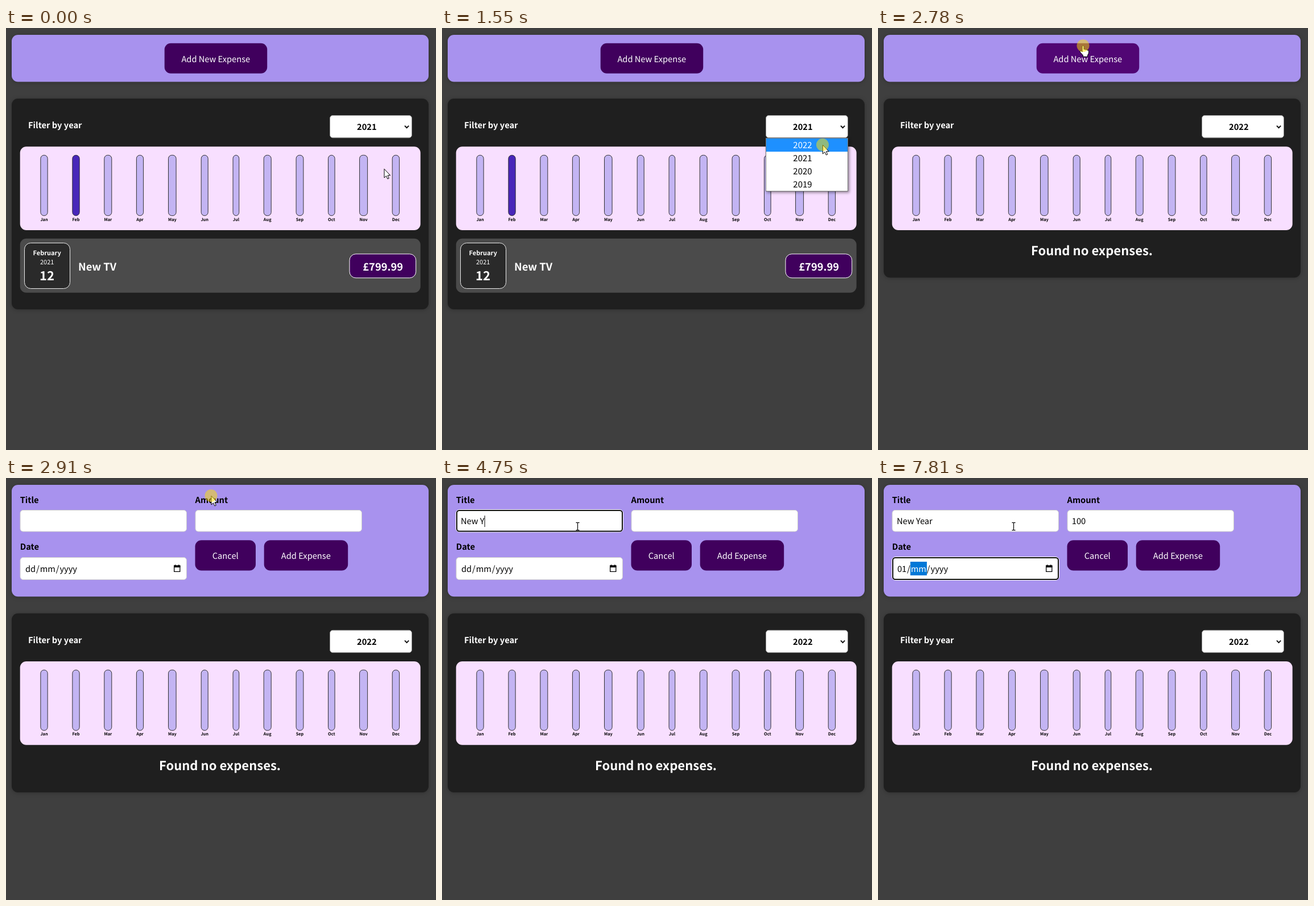
An HTML page for the animation above (8 s loop, 756 by 741 pixels).

```html
<!DOCTYPE html>
<html lang="en">
<head>
<meta charset="utf-8">
<title>Expense tracker</title>
<style>
  html, body { margin: 0; width: 100%; height: 100%; overflow: hidden; background: #3f3f3f; }
  svg { display: block; width: 756px; height: 741px; }
  text {
    font: 14.67px "Noto Sans CJK JP", "Noto Sans CJK SC", "Noto Sans CJK", sans-serif;
    white-space: pre; text-rendering: geometricPrecision;
  }
  .b { font-weight: 700; }
  .w { fill: #fff; }
  .m { text-anchor: middle; }
  .card { filter: drop-shadow(0 1px 3.7px rgba(0,0,0,.25)); }
  .btn { fill: #40005d; }
  .field { fill: #fff; stroke: #ccc; }
  .popup { filter: drop-shadow(2px 2px 2.5px rgba(0,0,0,.45)); }
</style>
</head>
<body>
<svg viewBox="0 0 756 741">
  <rect width="756" height="741" fill="#3f3f3f"/>
  <rect id="top" class="card" x="10" y="12" width="733" height="82.5" rx="11" fill="#a892ee"/>

  <g id="closed">
    <rect id="addNew" x="278.7" y="26.7" width="180.5" height="53" rx="11"/>
    <text class="w m" x="368.8" y="59.6">Add New Expense</text>
  </g>

  <g id="form">
    <text class="b" x="24.7" y="43.6">Title</text>
    <text class="b" x="332.5" y="43.6">Amount</text>
    <text class="b" x="24.7" y="126.3">Date</text>
    <rect class="field" x="25" y="56.5" width="292.5" height="37.5" rx="5"/>
    <rect class="field" x="333" y="56.5" width="292.5" height="37.5" rx="5"/>
    <rect class="field" x="25" y="139.5" width="292.5" height="39" rx="5"/>
    <g id="focus" fill="none">
      <rect id="ringOuter" stroke="#fff" rx="6.5"/>
      <rect id="ringInner" stroke="#101010" stroke-width="2" rx="4.5"/>
    </g>
    <text id="title" x="33" y="81.4"></text>
    <text id="amount" x="340.8" y="81.4"></text>
    <rect id="caret" y="66" width="1" height="20"/>
    <g id="spin">
      <rect x="603.5" y="66.5" width="14" height="18" fill="#efefef"/>
      <path d="M607 72.8L610.7 68.6L614.4 72.8ZM607 78.8H614.4L610.7 83Z" fill="#444"/>
    </g>
    <rect id="mark" y="147" height="24" fill="#0078d7"/>
    <g id="date"></g>
    <path d="M295.7 154.2H305.8V164.3H295.7Z" fill="none" stroke="#000" stroke-width="1.3"/>
    <path d="M295 153.5H306.4V157H295ZM296.8 152.3H298.4V154H296.8ZM303 152.3H304.6V154H303Z"/>
    <rect class="btn" x="332.5" y="109.2" width="106.5" height="53.2" rx="11"/>
    <rect class="btn" x="453.7" y="109.2" width="147.5" height="53.2" rx="11"/>
    <text class="w m" x="385.7" y="142.2">Cancel</text>
    <text class="w m" x="527.3" y="142.2">Add Expense</text>
  </g>

  <g id="panel">
    <rect id="body" class="card" x="10" y="124" width="733" rx="11" fill="#1f1f1f"/>
    <text class="b w" x="39" y="175.9">Filter by year</text>
    <rect x="569.5" y="153.5" width="144" height="39.3" rx="5" fill="#fff" stroke="#8a8a8a"/>
    <text id="year" class="b m" x="634.3" y="179.4"></text>
    <path d="M701 171.6L704.6 175.3L708.2 171.6" fill="none" stroke="#111" stroke-width="2"/>
    <rect x="24.7" y="208.2" width="704" height="146.7" rx="11" fill="#f8dfff"/>
    <g id="chart"></g>
    <g id="item">
      <rect x="24.7" y="369.7" width="704" height="95" rx="11" fill="#4b4b4b"/>
      <rect x="32.5" y="377.5" width="80" height="80" rx="11" fill="#2a2a2a" stroke="#ececec"/>
      <text class="b w m" x="72.2" y="399" style="font-size:11px">February</text>
      <text class="w m" x="72.2" y="414.6" style="font-size:11px">2021</text>
      <text class="b w m" x="72" y="443" style="font-size:22px">12</text>
      <text class="b w" x="127" y="425.7" style="font-size:18.33px">New TV</text>
      <rect class="btn" x="604" y="396.8" width="116.7" height="42" rx="11" stroke="#fff"/>
      <text class="b w m" x="662.7" y="425.7" style="font-size:18.33px">£799.99</text>
    </g>
    <text id="none" class="b w m" x="376" y="399" style="font-size:22px">Found no expenses.</text>
  </g>

  <g id="popup">
    <rect class="popup" x="569.5" y="193.5" width="144" height="93" fill="#fff" stroke="#767676"/>
    <rect id="hover" x="570" width="143" height="23.3" fill="#1e90ff"/>
    <g id="options"></g>
  </g>

  <g id="pointer">
    <path id="arrow" d="M.5 .5V16L4 12.7L6.4 18L8.8 17L6.5 11.8H11.2Z" fill="#fff" stroke="#000"/>
    <path id="hand" d="M-1.5 11V1Q0 -1 1.5 1V6.5Q3.5 5.5 4.5 7.2Q6.5 6.2 7.5 8Q9.5 7.5 10 9.5V13L8 17V19.5H0V17L-5.5 11Q-5.2 8.2 -3 9.2Z" fill="#fff" stroke="#000"/>
    <path id="beam" d="M-3 -6.7H-.8L0 -6L.8 -6.7H3M0 -6V6M-3 6.7H-.8L0 6L.8 6.7H3" fill="none" stroke="#000" stroke-width="1.2"/>
    <circle id="click" r="11" fill="#ffe100"/>
  </g>
</svg>
<script>
const LOOP = 8000;
const $ = id => document.getElementById(id);
const set = (el, attrs) => { for (const k in attrs) el.setAttribute(k, attrs[k]); return el; };
const show = (id, on) => { $(id).style.display = on ? "" : "none"; };
const add = (parent, tag, attrs, text = "") => {
  const el = set(document.createElementNS("http://www.w3.org/2000/svg", tag), attrs);
  el.textContent = text;
  return parent.appendChild(el);
};

// Month bars: [label, centre, width]
const months = [
  ["Jan", 67, 12.3], ["Feb", 123, 12.3], ["Mar", 179.3, 13], ["Apr", 235.5, 12.2],
  ["May", 292.3, 13.6], ["Jun", 349.2, 12], ["Jul", 404.4, 10.7], ["Aug", 459.7, 13],
  ["Sep", 516.5, 12.8], ["Oct", 572.3, 11.6], ["Nov", 628.6, 14], ["Dec", 685.4, 12.4]
];
const bar = (cx, w, attrs) =>
  add($("chart"), "rect", { x: cx - w / 2, y: 223.3, width: w, height: 106.2, rx: 6, ...attrs });
let fill;
for (const [label, cx, w] of months) {
  bar(cx, w, { fill: "#c3b4f3" });
  if (label === "Feb") fill = bar(cx, w, { fill: "#4826b9" });
  bar(cx, w, { fill: "none", stroke: "#313131" });
  add($("chart"), "text", { class: "b m", x: cx, y: 338.7, style: "font-size:7.33px" }, label);
}

const options = [2022, 2021, 2020, 2019].map((y, i) =>
  add($("options"), "text", { class: "m", x: 634, y: 211.4 + 23 * i, style: "font-size:15px" }, y));
const dateParts = [0, 1, 2, 3, 4].map(() => add($("date"), "text", { y: 165 }));

// Pointer hot spot: [time, x, y]
const path = [
  [40, 664.5, 247], [250, 669, 166], [830, 669, 166], [1150, 669, 199], [1250, 669, 199],
  [1350, 669, 205], [2190, 669, 205], [2640, 461, 90], [2740, 360.5, 31],
  [3130, 360.5, 31], [3580, 238.5, 85]
];
const clicks = [260, 1520, 2755, 3610];
const PICK = 1680, OPEN = 2910, FOCUS = 3620, TO_AMOUNT = 5680, TO_DATE = 7290;
const titleKeys = [3950, 4150, 4280, 4480, 4750, 5220, 5310, 5410];
const amountKeys = [6560, 6760, 6890];

const typed = (text, keys, t) => text.slice(0, keys.filter(k => t >= k).length);

function pointerAt(t) {
  const i = path.findIndex(p => p[0] > t);
  if (i === 0) return path[0].slice(1);
  if (i < 0) return path[path.length - 1].slice(1);
  const [a, b] = [path[i - 1], path[i]], k = (t - a[0]) / (b[0] - a[0]);
  return [a[1] + (b[1] - a[1]) * k, a[2] + (b[2] - a[2]) * k];
}

function drawDate(t) {
  const active = t < TO_DATE ? -1 : t < 7810 ? 0 : 2;
  const day = t < 7690 ? "dd" : t < 7810 ? "00" : "01";
  const pad = 0.92;
  let x = 33;
  [day, "/", "mm", "/", "yyyy"].forEach((s, i) => {
    const el = dateParts[i], gap = i % 2 ? 0 : pad;
    el.textContent = s;
    set(el, { x: x + gap, fill: i === active ? "#fff" : "#000" });
    const w = el.getComputedTextLength() + 2 * gap;
    if (i === active) set($("mark"), { x, width: w });
    x += w;
  });
  show("mark", active >= 0);
}

function drawForm(t) {
  const title = t < TO_AMOUNT;
  const date = t >= TO_DATE;
  const [x, y, h] = title ? [24, 55, 40.5] : date ? [24, 138, 42] : [332, 55, 40.5];
  show("focus", t >= FOCUS);
  set($("ringOuter"), { x: x + 0.5, y: y + 0.5, width: 294, height: h - 1 });
  set($("ringInner"), { x: x + 2, y: y + 2, width: 291, height: h - 4 });
  $("title").textContent = typed("New Year", titleKeys, t);
  $("amount").textContent = typed("100", amountKeys, t);
  const el = $(title ? "title" : "amount");
  set($("caret"), { x: +el.getAttribute("x") + (el.textContent ? el.getComputedTextLength() : 0) });
  show("caret", t >= FOCUS && !date && !(t >= 6210 && t < amountKeys[0]));
  show("spin", !title && !date);
  drawDate(t);
}

function drawPointer(t, x, y, onButton) {
  const beam = t >= OPEN && y > 56 && x < 318;
  set($("pointer"), { transform: `translate(${x} ${y})` });
  show("hand", onButton);
  show("beam", beam);
  show("arrow", !onButton && !beam);
  const age = Math.min(...clicks.map(c => t >= c ? t - c : LOOP));
  set($("click"), { opacity: 0.5 * Math.max(0, Math.min(1, (260 - age) / 100)) });
}

function draw(t) {
  const [x, y] = pointerAt(t);
  const picked = t >= PICK, opened = t >= OPEN;
  const onButton = !opened && x > 279 && x < 459 && y > 27 && y < 79;

  show("closed", !opened);
  show("form", opened);
  set($("top"), { height: opened ? 196.3 : 82.5 });
  set($("addNew"), { fill: onButton ? "#510674" : "#40005d" });
  if (opened) drawForm(t);

  set($("panel"), { transform: `translate(0 ${opened ? 113.8 : 0})` });
  set($("body"), { height: picked ? 314.2 : 370 });
  $("year").textContent = picked ? "2022" : "2021";
  show("item", !picked);
  show("none", picked);

  // Ease-out drain of the February bar
  const k = Math.max(0, Math.min(1, (t - PICK) / 300));
  const level = (1 - k) ** 2;
  set(fill, { y: 223.3 + 106.2 * (1 - level), height: 106.2 * level });

  show("popup", t >= 270 && !picked);
  const row = y > 193 ? 0 : 1;
  set($("hover"), { y: 193.9 + 23 * row });
  options.forEach((o, i) => set(o, { fill: i === row ? "#fff" : "#000" }));

  drawPointer(t, x, y, onButton);
}

const start = performance.now();
function tick() {
  draw((performance.now() - start) % LOOP);
  requestAnimationFrame(tick);
}
tick();
</script>
</body>
</html>
```
